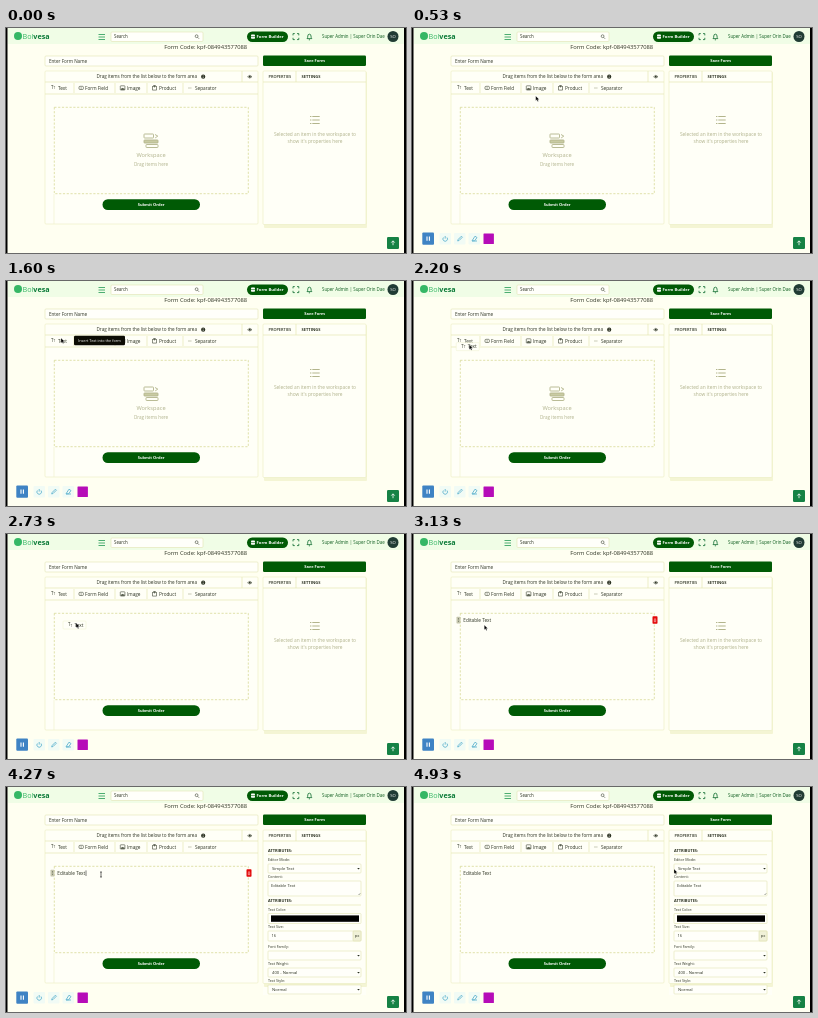
Write an HTML page that moves like this. It is 400 px wide and 225 px high and loops after 5 s.

```html
<!DOCTYPE html>
<html lang="en">
<head>
<meta charset="utf-8">
<title>Form builder</title>
<style>
  html, body { margin: 0; width: 100%; height: 100%; overflow: hidden; background: #000; }
  svg { display: block; width: 100vw; height: 100vh; }
  text { font-family: "Open Sans", "Noto Sans", sans-serif; fill: #2c3222; }
  .bold { font-weight: 700; }
  .semi { font-weight: 600; }
  .white { fill: #fff; }
  .faint { fill: #b0b28c; }
  .green { fill: #0b5a1c; }
  .line { fill: none; stroke: #e6e7b4; stroke-width: .7; }
  .icon { fill: none; stroke: #3f4634; stroke-width: .6; }
  .box { fill: #fffffa; stroke: #e3e4b4; stroke-width: .6; }
  .card { fill: #fffff7; stroke: #ebecc2; stroke-width: .6; }
  .btn { fill: #005a05; }
</style>
</head>
<body>
<svg viewBox="0 0 400 225" preserveAspectRatio="none" id="stage"></svg>
<script>
const LOOP = 5000, TICK = 1000 / 15;

const rect = (x, y, w, h, cls, r = 0, extra = '') =>
  `<rect x="${x}" y="${y}" width="${w}" height="${h}" rx="${r}" class="${cls}" ${extra}/>`;
const path = (d, cls = 'icon', extra = '') => `<path d="${d}" class="${cls}" ${extra}/>`;
// y is the middle of the lower-case letters
const text = (s, x, y, size, cls = '', anchor = 'start') =>
  `<text x="${x}" y="${y + size * .33}" font-size="${size}" class="${cls}" text-anchor="${anchor}">${s}</text>`;
const group = (id, body) => `<g id="${id}">${body}</g>`;

const textIcon = (x, y) => text('T', x - 2, y, 4.4) + text('T', x + .5, y + .5, 3);

function header() {
  return rect(2, 0, 396, 16, '', 0, 'fill="#f0fde6"')
    + '<circle cx="12" cy="8" r="4" fill="#35b765"/>'
    + '<text x="16.5" y="10.6" font-size="7.2" style="fill:#35b765">Bol<tspan class="bold" fill="#0b7a38">vesa</tspan></text>'
    + path('M92.5 6.5h6.5M92.5 9h6.5M92.5 11.5h6.5', 'icon', 'style="stroke:#3aa566;stroke-width:.9"')
    + rect(105, 4, 92, 9.5, 'box', 1)
    + text('Search', 108, 8.7, 4.4)
    + '<circle cx="190.6" cy="8.2" r="1.4" class="icon"/>' + path('M191.6 9.3l1.5 1.5')
    + rect(241, 3.5, 41, 10.5, 'btn', 5.2)
    + rect(245, 6.5, 4, 4.2, 'white', .8) + path('M245 8.6h4', 'icon', 'style="stroke:#005a05"')
    + text('Form Builder', 250.5, 8.7, 4.2, 'bold white')
    + path('M287 7.4v-1.8h1.8M291 5.6h1.8v1.8M292.8 9.8v1.8H291M288.8 11.6H287V9.8', 'icon', 'style="stroke:#0b6a2c;stroke-width:.8"')
    + path('M301 10.6q.8-.8.8-2.6a1.6 1.8 0 0 1 3.2 0q0 1.8.8 2.6zM302.8 11.8h1.2', 'icon', 'style="stroke:#0b6a2c;stroke-width:.8"')
    + text('Super Admin | Super Orin Dae', 316, 8.7, 4.4, 'green')
    + '<circle cx="387" cy="8.5" r="5.5" fill="#203c34"/>'
    + text('SO', 387, 8.6, 4.2, 'white', 'middle');
}

function tabs() {
  return textIcon(47, 60) + text('Text', 52, 60, 4.7)
    + rect(73, 58.3, 4.4, 3.2, 'icon', 1) + path('M74.5 60h1.4') + text('Form Field', 79, 60, 4.7)
    + rect(114.3, 57.8, 4.6, 4.2, 'icon', .5) + path('M114.5 61.8l1.6-2 1.1 1 .7-.8 1 1.8z', '', 'fill="#3f4634"') + text('Image', 121, 60, 4.7)
    + path('M146.5 58.5h4v3.6h-4zM146.5 58.5l1-1h2l1 1M148.5 57.5v2') + text('Product', 153, 60, 4.7)
    + path('M182 60h3.6', 'icon', 'style="stroke:#a7a98a"') + text('Separator', 189, 60, 4.7);
}

function workArea() {
  return rect(39, 28, 213, 10, 'box', 1) + text('Enter Form Name', 43, 33, 4.6)
    + rect(39, 43, 213, 153, 'card', 1)
    + text('Drag items from the list below to the form area', 90.5, 48.7, 4.6)
    + '<circle cx="197.2" cy="48.7" r="2.1" fill="#2c3222"/>' + path('M197.2 47.4v.6M197.2 48.5v1.5', 'icon', 'style="stroke:#fff"')
    + path('M241.6 48.7q2.2-2.8 4.4 0q-2.2 2.8-4.4 0z') + '<circle cx="243.8" cy="48.7" r=".9" fill="#2c3222"/>'
    + path('M236 43v11M39 54h213M39 66h213M68 55v10M109 55v10M141 55v10M177 55v10', 'line')
    + path('M48 166v30', 'line', 'style="stroke:#f1f2cf"')
    + tabs()
    + rect(48.3, 79.3, 194, 86.4, 'line', 0, 'stroke-dasharray="2.2 1.6" style="stroke:#d3d58c"')
    + rect(96.5, 171.3, 97.5, 10.7, 'btn', 5.3)
    + text('Submit Order', 145.2, 176.8, 4, 'bold white', 'middle');
}

function placeholder() {
  return `<g fill="none" stroke="#b3b58c" stroke-width=".9">
      <rect x="138" y="106" width="9.5" height="4" rx=".6"/>
      <rect x="138" y="112" width="14" height="3" rx=".6" fill="#c9cba3"/>
      <rect x="140" y="116.5" width="12" height="3" rx=".6"/>
      <path d="M149 106.5l2.8 1.6l-2.6 1.8"/></g>`
    + text('Workspace', 145, 127, 5.7, 'faint', 'middle')
    + text('Drag items here', 145, 136, 4.6, 'faint', 'middle');
}

const select = (label, value, y) =>
  text(label, 262, y, 3.7) + rect(262, y + 4, 93, 9, 'box', .8) + text(value, 266, y + 8.7, 4.2)
  + path(`M351.2 ${y + 8}h2.6l-1.3 1.6z`, '', 'fill="#2c3222"');

function properties() {
  return rect(257, 200, 103, 8, '', 0, 'fill="#fffff7"')
    + text('ATTRIBUTES:', 262, 64, 3.9, 'bold') + path('M262 67.7h93M262 118h93', 'line')
    + select('Editor Mode:', 'Simple Text', 73)
    + text('Content:', 262, 90, 3.7) + rect(262, 94, 93, 15, 'box', .8)
    + text('Editable Text', 265, 98.7, 4.1) + path('M352.6 108l1.6-1.6')
    + text('ATTRIBUTES:', 262, 114, 3.9, 'bold')
    + text('Text Color:', 262, 123, 3.7) + rect(262, 126.5, 93, 10, 'box', .8) + rect(265, 128.4, 88, 6.4, '')
    + text('Text Size:', 262, 140, 3.7) + rect(262, 144, 93, 10, 'box', .8) + text('16', 265.5, 149, 4.1)
    + rect(347, 144, 8, 10, '', .8, 'fill="#f0f1d8" stroke="#dedfae" stroke-width=".6"') + text('px', 351, 149, 4, '', 'middle')
    + select('Font Family:', '', 160)
    + select('Text Weight:', '400 - Normal', 177)
    + select('Text Style:', 'Normal', 194);
}

function sidePanel() {
  return rect(257, 27.5, 103, 10.5, 'btn', 1.2) + text('Save Form', 308.6, 32.9, 4, 'bold white', 'middle')
    + rect(258, 44, 103, 156, '', 1, 'fill="#f4f5d4"') + rect(257, 43, 103, 153.5, 'card', 1)
    + path('M257 54h103M290 43v11', 'line')
    + text('PROPERTIES', 262.5, 48.8, 3.9, 'semi') + text('SETTINGS', 295.5, 48.8, 4, 'bold')
    + group('empty',
      [88.5, 92, 95.5].map(y => path(`M304 ${y}h1.4M306.3 ${y}h7.4`, 'icon', 'style="stroke:#b3b58c;stroke-width:1"')).join('')
      + text('Selected an item in the workspace to', 309, 106.5, 4.8, 'faint', 'middle')
      + text("show it's properties here", 309, 113.7, 4.8, 'faint', 'middle'))
    + group('props', properties());
}

function recorder() {
  const pale = x => rect(x, 205, 11.5, 11.5, '', 1, 'fill="#f1fbf5"');
  const blue = 'style="stroke:#62b5d0;stroke-width:.9"';
  return rect(10.3, 204.5, 11.7, 12.3, '', 1, 'fill="#3f83c4"')
    + path('M15 208.5v4.2M17.4 208.5v4.2', 'icon', 'style="stroke:#fff;stroke-width:1.1"')
    + [27.5, 42, 56.5].map(pale).join('')
    + path('M31.4 209.5a2.3 2.3 0 1 0 3.6 0M33.2 208v2.6', 'icon', blue)
    + path('M45.7 213l.5-1.6 3.2-3.2 1 1-3.2 3.2z', 'icon', blue)
    + path('M60 212.8l3-4.6 2 1.4-2.4 3.2zM60 213h5', 'icon', blue)
    + rect(71.5, 205.4, 10.4, 10.6, '', .5, 'fill="#b60cb8"');
}

document.getElementById('stage').innerHTML =
  rect(1.5, 0, 396.5, 225, '', 0, 'fill="#fffff1"')
  + header()
  + text('Form Code: kpf-084943577088', 199.7, 19.3, 5.8, '', 'middle')
  + workArea() + sidePanel()
  + rect(381, 209, 12, 12, '', 1.2, 'fill="#168245"')
  + path('M387 217.2v-4.2M385.3 214.6l1.7-1.8 1.7 1.8', 'icon', 'style="stroke:#fff;stroke-width:.8"')
  + group('hint', placeholder())
  + group('item', text('Editable Text', 51.3, 86.2, 4.7))
  + group('tools',
    rect(44.5, 82.8, 4, 6.6, '', .6, 'fill="#c5c6ad"') + path('M46.5 84v4.2', 'icon', 'stroke-dasharray=".8 .7"')
    + rect(240.5, 82.3, 5, 7.4, '', .8, 'fill="#e30808"') + path('M242 85h2M242.3 85.5v2.2h1.4v-2.2', 'icon', 'style="stroke:#fff;stroke-width:.5"'))
  + group('caret', path('M80 83.4v5.6', 'icon', 'style="stroke:#222"'))
  + group('tip', rect(68, 54.8, 51, 9.4, '', 1.2, 'fill="#0c0c04"') + text('Insert Text into the form', 93.5, 59.6, 3.8, 'white', 'middle'))
  + group('chip', rect(-13, -2, 23, 8, '', .8, 'fill="#fffff8" stroke="#eff0cc" stroke-width=".5"') + textIcon(-6, 2) + text('Text', -1.5, 2, 4.7))
  + group('tray', recorder())
  + group('arrow', path('M0 0v4.8l1.1-1 .8 1.8 .9-.4-.8-1.7h1.5z', '', 'fill="#000" stroke="#fff" stroke-width=".25"'))
  + group('beam', path('M-1 0h2M0 0v5M-1 5h2', 'icon', 'style="stroke:#111"'));

// time, x, y of the pointer tip
const PATH = [
  [70, 176, 134], [330, 143, 92], [530, 124, 68], [800, 101, 63], [1070, 66, 59], [1400, 55, 57],
  [2000, 55, 57], [2270, 58, 66], [2530, 66, 82], [2730, 70, 89], [2930, 72, 91],
  [3670, 73, 91], [4070, 95, 85], [4530, 95, 85], [4730, 170, 84], [4930, 262, 82]
];

// when each part is on show
const SHOWN = {
  tray: [[130, LOOP]],
  tip: [[1330, 2060]],
  hint: [[0, 2460]],
  chip: [[2060, 2930]],
  item: [[2930, LOOP]],
  tools: [[3130, 4860]],
  empty: [[0, 3260]],
  props: [[3260, LOOP]],
  caret: [[4190, 4660]],
  arrow: [[60, 3860], [4660, LOOP]],
  beam: [[3860, 4660]]
};

const el = id => document.getElementById(id);

function pointer(t) {
  const i = PATH.findIndex(p => p[0] > t);
  if (i === 0) return PATH[0].slice(1);
  if (i < 0) return PATH[PATH.length - 1].slice(1);
  const [a, b] = [PATH[i - 1], PATH[i]];
  const k = (t - a[0]) / (b[0] - a[0]);
  return [a[1] + (b[1] - a[1]) * k, a[2] + (b[2] - a[2]) * k];
}

function draw() {
  const now = performance.now() % LOOP;
  const t = Math.floor((now + 4) / TICK) * TICK;
  for (const id in SHOWN) {
    const on = SHOWN[id].some(([from, to]) => t >= from && t < to);
    el(id).style.display = on ? '' : 'none';
  }
  const [x, y] = pointer(t);
  for (const id of ['arrow', 'beam', 'chip']) el(id).setAttribute('transform', `translate(${x} ${y})`);
  requestAnimationFrame(draw);
}
draw();
</script>
</body>
</html>
```
